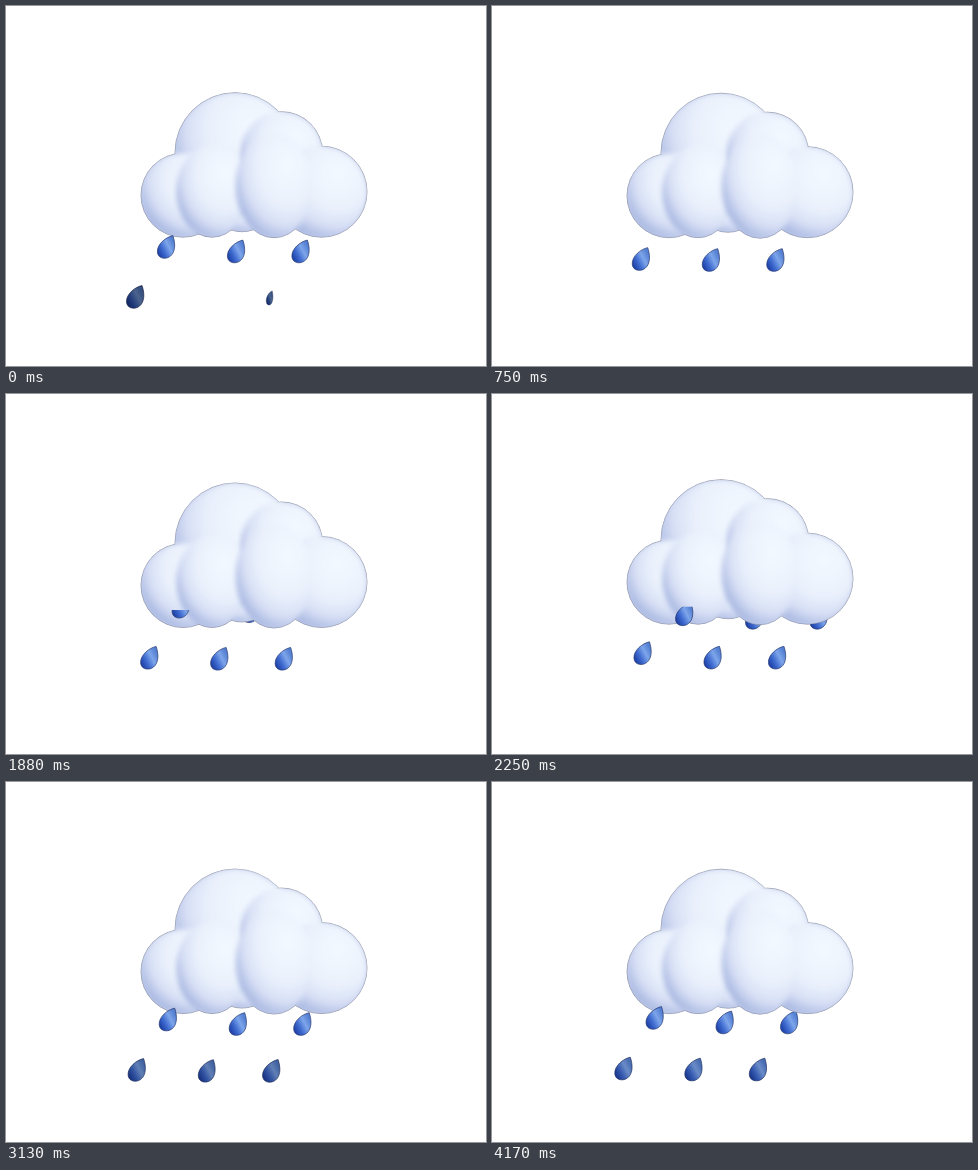
An HTML page that plays this animation: 480x360 px, repeating every 4.21 s.

```html
<!DOCTYPE html>
<html lang="en">
<head>
<meta charset="utf-8">
<title>Rain cloud</title>
<style>
  html, body { margin: 0; width: 100%; height: 100%; overflow: hidden; background: #fff; }
  svg { display: block; width: 480px; height: 360px; }
</style>
</head>
<body>
<svg viewBox="0 0 480 360">
  <defs>
    <radialGradient id="puff" cx=".68" cy=".3" r=".78">
      <stop offset="0" stop-color="#f3f9ff"/>
      <stop offset=".5" stop-color="#eaf1fc"/>
      <stop offset=".75" stop-color="#d7dff5"/>
      <stop offset="1" stop-color="#9fb0dd"/>
    </radialGradient>
    <linearGradient id="water" x1=".1" y1=".8" x2=".9" y2=".25">
      <stop offset="0" stop-color="#2145ab"/>
      <stop offset=".3" stop-color="#3f6bd0"/>
      <stop offset=".65" stop-color="#7da5ea"/>
      <stop offset="1" stop-color="#5580d2"/>
    </linearGradient>
    <filter id="soft"><feGaussianBlur stdDeviation="2.5"/></filter>
    <clipPath id="outline"></clipPath>
    <clipPath id="below"><rect id="belowRect" width="480" height="150"/></clipPath>
    <path id="drop" d="M7,-11.5C9.5,-4 9.5,3 6,7.5C2,13 -8,12.5 -8.5,5C-9,-3 0,-10 7,-11.5Z"
      fill="url(#water)" stroke="#26396f" stroke-width=".7"/>
  </defs>
  <g id="back"></g>
  <g id="cloud">
    <g id="rim" fill="#c3cdec" stroke="#686d82" stroke-width=".6"></g>
    <g clip-path="url(#outline)"><g id="puffs" fill="url(#puff)"></g></g>
  </g>
  <g id="front" clip-path="url(#below)"></g>
</svg>
<script>
const LOOP = 4210, FALL = LOOP / 4, BOB = LOOP / 2;
const LEAD = 200; // ms a drop spends hidden inside the cloud
const EDGE = 229; // height at which drops leave the cloud
const $ = id => document.getElementById(id);
const clamp = v => Math.min(1, Math.max(0, v));

function add(parent, tag, attrs) {
  const el = document.createElementNS('http://www.w3.org/2000/svg', tag);
  for (const key in attrs) el.setAttribute(key, attrs[key]);
  return parent.appendChild(el);
}

// Cloud lobes from back to front: centre and radii
const lobes = [
  [236, 199, 30, 26], [229, 146, 60, 60], [275.5, 146, 41, 41],
  [315.5, 185, 45.5, 45.5], [177, 188.5, 42, 42], [206, 184.5, 36, 46], [268, 179, 38.5, 52]
];
for (const [cx, cy, rx, ry] of lobes) {
  const shape = { cx, cy, rx, ry };
  add($('rim'), 'ellipse', shape);
  add($('outline'), 'ellipse', shape);
  add($('puffs'), 'ellipse', { ...shape, filter: 'url(#soft)' });
}

// Rows of drops: exit time, x at the exit, speed, drag, drop of the other columns
const rows = [
  { exit: 594, x: 161.3, speed: .1635, drag: 6.2e-5, lag: 1 },
  { exit: 957, x: 166.2, speed: .1255, drag: 0, lag: 4.5 },
  { exit: 214, x: 187.6, speed: .1255, drag: 0, lag: 3.5 }
];
const columns = [{ dx: 0, end: 295 }, { dx: 70, end: 290.5 }, { dx: 134.5, end: 292 }];
const drops = rows.flatMap(row => columns.map(col => ({
  ...row, ...col, el: add($(col.dx ? 'back' : 'front'), 'use', { href: '#drop' })
})));

function bob(t) {
  const a = t / BOB * 2 * Math.PI;
  return .2 + .9 * Math.cos(a - .5) - 2.1 * Math.sin(2 * a - .25) - .8 * Math.cos(3 * a);
}

function moveDrop({ el, exit, x, speed, drag, lag, dx, end }, t) {
  const d = (t - exit + LEAD + LOOP) % FALL - LEAD;
  const fall = speed * d - drag * d * d, y = EDGE + fall;
  // Drops darken and thin out just before they vanish
  const size = clamp((end - y) / 2.5);
  const light = 1 - .45 * clamp((y - 284) / 8);
  el.style.display = size ? '' : 'none';
  el.style.filter = light < 1 ? `brightness(${light})` : 'none';
  el.setAttribute('transform',
    `translate(${x + dx - .52 * fall} ${y + (dx && lag)}) scale(${size} ${Math.sqrt(size)})`);
}

function draw(t) {
  const lift = bob(t);
  $('cloud').setAttribute('transform', `translate(0 ${lift})`);
  $('belowRect').setAttribute('y', 213 + lift);
  for (const drop of drops) moveDrop(drop, t);
}

const begin = performance.now();
function tick() {
  draw((performance.now() - begin) % LOOP);
  requestAnimationFrame(tick);
}
tick();
</script>
</body>
</html>
```
